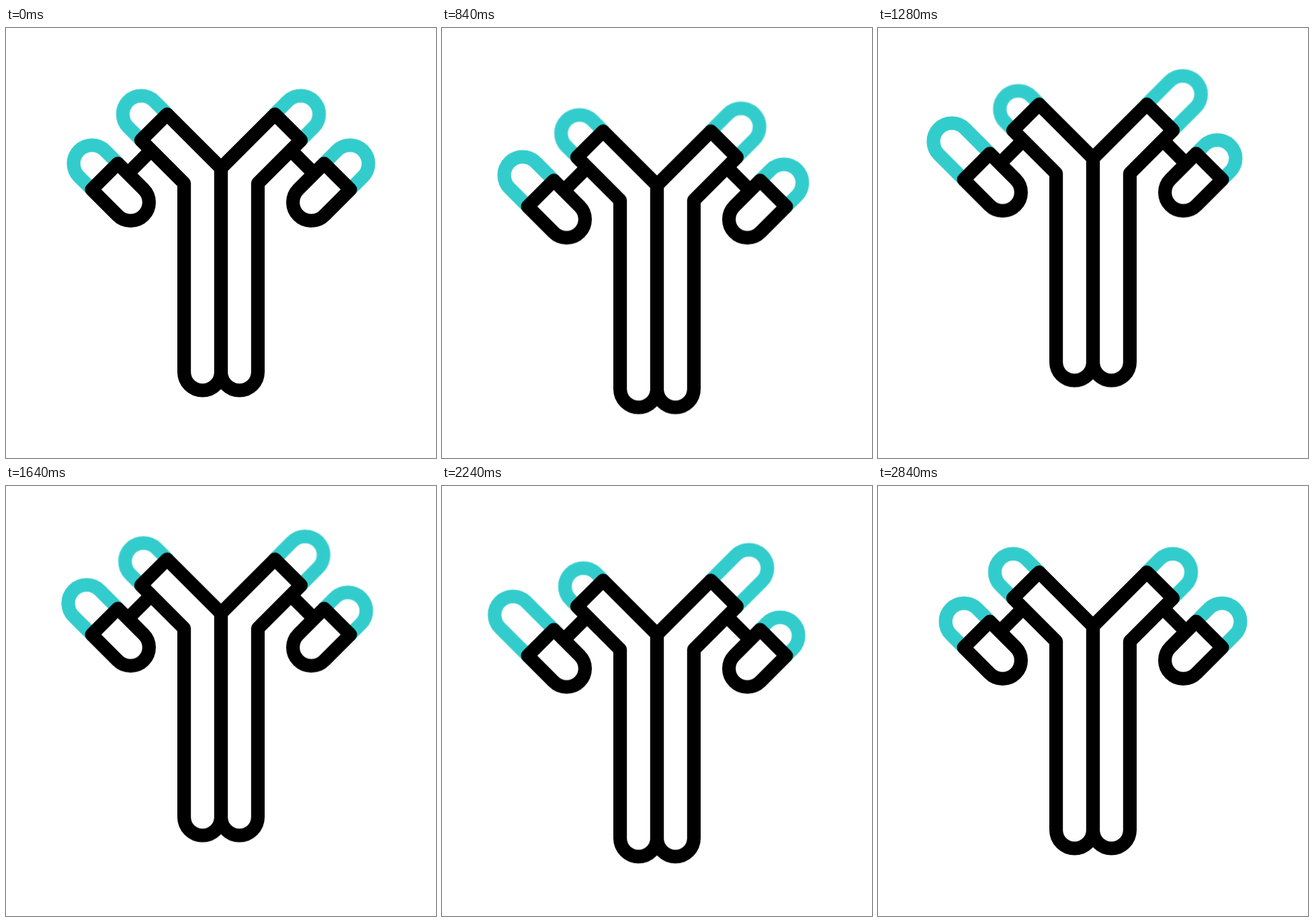
Recreate the animation shown at these times as an HTML page. Size 640 by 640 pixels, loop 3 s.

```html
<!DOCTYPE html>
<html lang="en">
<head>
<meta charset="utf-8">
<title>Antibody</title>
<style>
  html, body { margin: 0; width: 100%; height: 100%; overflow: hidden; background: #fff; }
  svg { display: block; width: 100%; height: 100%; }
  path { fill: none; stroke: #000; stroke-width: 20.2; stroke-linejoin: round; }
  .cap { stroke: #3cc; }

  .body, .cap { animation: 3s cubic-bezier(.3333, 0, .6667, 1) infinite; }
  .body { animation-name: float; }
  .cap { animation-name: slide; }

  @keyframes float {
    0%, 6.667% { transform: translateY(0); }
    26.667% { transform: translateY(25.8px); }
    49.333% { transform: translateY(-25.4px); }
    70.667% { transform: translateY(13.3px); }
    94%, 100% { transform: translateY(0); }
  }
  /* --d: diagonal travel, negative grows the cap, positive sinks it */
  @keyframes slide {
    0%, 6.667%, 33.333%, 60%, 86.667%, 100% { transform: translate(0, 0); }
    20%, 46.667%, 73.333% { transform: translate(var(--d), var(--d)); }
  }
</style>
</head>
<body>
<svg viewBox="0 0 640 640">
  <defs>
    <clipPath id="tip"><path d="M-120 160L160 -120H-120Z"/></clipPath>
    <path id="cap" d="M62.4 23.6L19.4 -19.4A27.4 27.4 0 0 0 -19.4 19.4L23.6 62.4" style="stroke: inherit"/>
    <g id="half">
      <path d="M320 208.5L239.8 128.3L201 167L265.1 231.1V511.9A27.4 27.4 0 0 0 320 511.9Z"/>
      <path d="M216 182L181.4 216.6"/>
      <path d="M166.4 201.6L204.9 240.1A27.4 27.4 0 0 1 166.1 278.9L127.6 240.4Z"/>
    </g>
  </defs>
  <g class="body">
    <g transform="translate(201.3 128.2)" clip-path="url(#tip)"><use href="#cap" class="cap" style="--d: 9.4px"/></g>
    <g transform="translate(128 201.8)" clip-path="url(#tip)"><use href="#cap" class="cap" style="--d: -23px"/></g>
    <use href="#half"/>
    <g transform="matrix(-1 0 0 1 640 0)">
      <g transform="translate(201.3 128.2)" clip-path="url(#tip)"><use href="#cap" class="cap" style="--d: -18.8px"/></g>
      <g transform="translate(128 201.8)" clip-path="url(#tip)"><use href="#cap" class="cap" style="--d: 9px"/></g>
      <use href="#half"/>
    </g>
  </g>
</svg>
</body>
</html>
```
